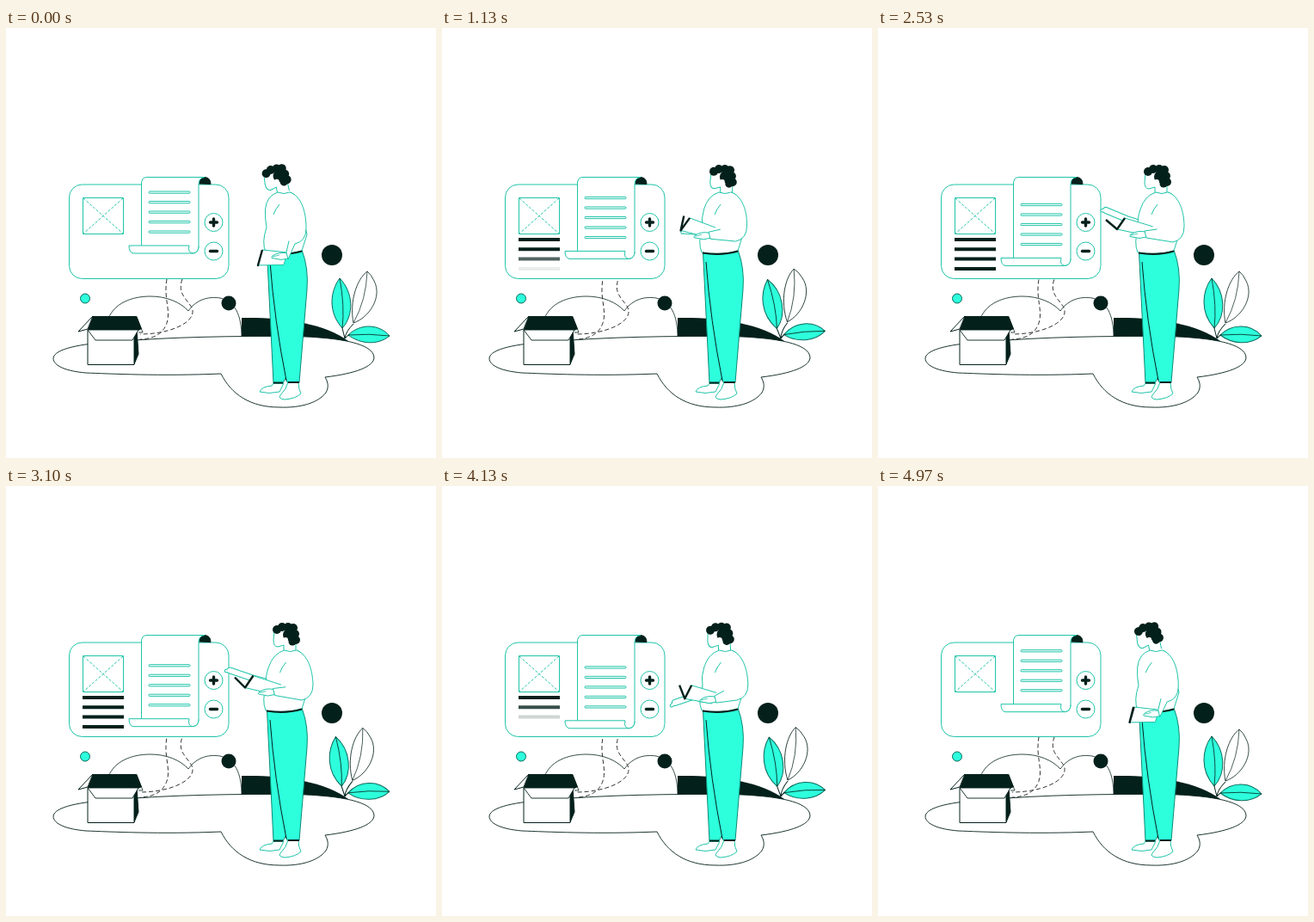
Recreate the animation shown at these times as an HTML page with a canvas. Size 500 by 500 pixels, loop 5 s.

```html
<!DOCTYPE html>
<html lang="en">
<head>
<meta charset="utf-8">
<title>Checking the list</title>
<style>
html, body { margin: 0; width: 100%; height: 100%; overflow: hidden; background: #fff; }
canvas { display: block; width: 500px; height: 500px; }
</style>
</head>
<body>
<canvas id="stage" width="500" height="500"></canvas>
<script>
const LOOP = 5000;
const DARK = '#03201b', TEAL = '#2dffdc', LINE = '#1fc4a8', WHITE = '#fff';
const ctx = document.getElementById('stage').getContext('2d');
const clamp = v => Math.max(0, Math.min(1, v));

// head x, head angle, shoulder x, elbow, wrist, spine foot, spine top, page corner, cover tip, far elbow, far hand
const poses = [
  [0,    -12, -12, -7, 338, 238, 320, 265, 293, 276, 298, 258, 327, 261, 298, 258, 312, 262, 302, 268],
  [630,    0,   0,  0, 345, 236, 306, 248, 280, 246, 289, 231, 320, 239, 289, 231, 308, 240, 294, 241],
  [1670,   2,   2, -2, 342, 234, 302, 234, 275, 224, 287, 210, 317, 225, 273, 205, 295, 234, 271, 230],
  [2530,  -1,   0,  0, 345, 236, 304, 240, 278, 234, 287, 221, 320, 231, 265, 223, 289, 222, 265, 212],
  [3670,   1,   0,  1, 347, 236, 305, 239, 278, 235, 288, 220, 322, 232, 267, 222, 282, 224, 256, 217],
  [4530,  -6,  -7, -2, 343, 236, 316, 256, 286, 258, 292, 242, 318, 248, 284, 240, 303, 262, 284, 282]
];
poses.push([LOOP, ...poses[0].slice(1)]);

function poseAt(t) {
  const i = poses.findIndex(p => p[0] > t);
  const a = poses[i - 1], b = poses[i], k = (t - a[0]) / (b[0] - a[0]);
  return a.map((v, j) => v + (b[j] - v) * k).slice(1);
}

function draw(d, fill, stroke, width = 1) {
  const path = new Path2D(d);
  if (fill) { ctx.fillStyle = fill; ctx.fill(path); }
  if (stroke) { ctx.strokeStyle = stroke; ctx.lineWidth = width; ctx.stroke(path); }
}

function dot(x, y, r, fill, stroke) {
  ctx.beginPath();
  ctx.arc(x, y, r, 0, Math.PI * 2);
  if (fill) { ctx.fillStyle = fill; ctx.fill(); }
  if (stroke) { ctx.strokeStyle = stroke; ctx.lineWidth = 1; ctx.stroke(); }
}

function box(x, y, w, h, r, fill, stroke) {
  ctx.beginPath();
  ctx.roundRect(x, y, w, h, r);
  if (fill) { ctx.fillStyle = fill; ctx.fill(); }
  if (stroke) { ctx.strokeStyle = stroke; ctx.lineWidth = 1; ctx.stroke(); }
}

function dashed(d, color, dash, shift = 0) {
  ctx.setLineDash(dash);
  ctx.lineDashOffset = shift;
  draw(d, null, color);
  ctx.setLineDash([]);
}

function turned(x, y, deg, paint) {
  ctx.save();
  ctx.translate(x, y);
  ctx.rotate(deg * Math.PI / 180);
  paint();
  ctx.restore();
}

function scenery(t) {
  draw('M119 338C126 320 146 312 168 312C187 312 203 319 212 329C222 315 236 312 249 314C266 318 274 333 274 360L119 364Z', WHITE, DARK, .8);
  draw('M274 337C320 336 370 343 398 364L274 361Z', DARK);
  draw('M55 384C56 373 87 367 125 365C190 359 270 358 335 358.500C390 360 427 367 428 383C428 394 405 402 371 406C374 411 376 417 372 424C363 436 342 442 318 441C284 441 262 426 250 402C180 405 120 402 93 401C70 399 55 393 55 384Z', WHITE, DARK, .9);
  const flow = -80 * t / LOOP;
  dashed('M187 292C183 315 192 328 187 343Q181 361 156 362', '#333', [5, 3], flow);
  dashed('M205 292C198 311 214 317 217 328C219 344 188 356 156 356', '#333', [5, 3], flow);
  dot(259, 320, 8.5, DARK);
  dot(379, 264, 12, DARK);
  dot(92, 314.500, 5.5, TEAL, '#0a6b5c');
}

function carton() {
  draw('M101 335H152L158 350L149 354L95 351Z', DARK);
  draw('M149 354L152 350L154 379L149 391Z', DARK, DARK);
  draw('M95 351H149V391.500H95Z', WHITE, DARK);
  draw('M101 335L84 353L95 350Z', WHITE, DARK);
  draw('M95 351L104 363H147L154 351Z', WHITE, DARK, .9);
  draw('M152 336L159 354L154 354', null, DARK, .8);
}

function plant(t) {
  const sway = -8 * Math.sin(Math.PI * t / 2500) ** 2;
  turned(394, 361, sway, () => {
    draw('M0 0Q1 -8 10 -17M0 0L-3 -12M0 0L4 -4', null, DARK);
    draw('M26 -78C14 -69 5 -43 10 -18C28 -24 44 -48 34 -67Q31 -74 26 -78Z', WHITE, DARK, .8);
    draw('M26 -78Q25 -45 10 -18', null, DARK, .7);
    draw('M-6 -70C-17 -55 -20 -31 -3 -12C11 -27 10 -54 -6 -70Z', TEAL, '#0a6b5c');
    draw('M-6 -70Q0 -38 -3 -12', null, DARK, .8);
  });
  turned(394, 361, sway * .8, () => {
    draw('M4 -4C18 -18 40 -17 52 -3C39 8 18 7 4 -4Z', TEAL, '#0a6b5c');
    draw('M0 0L4 -4Q28 -6 52 -3', null, DARK, .8);
  });
}

function card(t) {
  box(73.5, 182, 185.5, 109.500, 15, WHITE, LINE);
  box(89.5, 197.5, 47, 42, 0, null, LINE);
  dashed('M90 198L136 239M136 198L90 239', LINE, [3, 2]);

  const near = Math.min(t, LOOP - t);
  for (let i = 0; i < 4; i++) {
    ctx.globalAlpha = clamp((near - 130 - 320 * i) / 530);
    box(89, 244 + 11.3 * i, 48, 4, 0, DARK);
  }
  ctx.globalAlpha = 1;

  for (const y of [226, 259.500]) {
    dot(241.500, y, 10.5, WHITE, LINE);
    ctx.lineCap = 'round';
    draw(`M237.500 ${y}h8` + (y < 240 ? `M241.500 ${y - 4}v8` : ''), null, DARK, 3.4);
    ctx.lineCap = 'butt';
  }
}

function receipt(t) {
  const drop = t < 4000 ? 5.7 * t / 1000 : 22.8 * (LOOP - t) / 1000;
  draw('M224 181Q225 174 231 173.500Q238 174 238 181.500Z', DARK, DARK);
  draw(`M157.500 ${253 + drop}V180Q158 173.500 164 173.500H231Q224 174 224 182V${255 + drop}Q223 262 217 262V${253 + drop}Z`, WHITE);
  draw(`M157.500 ${253 + drop}V180Q158 173.500 164 173.500H231Q224 174 224 182V${255 + drop}Q223 ${262 + drop} 217 ${262 + drop}`, WHITE, LINE);
  draw(`M217 ${262 + drop}H148Q143 ${261 + drop} 143 ${253 + drop}H213Q211 ${261 + drop} 217 ${262 + drop}Q224 ${261 + drop} 224 ${254 + drop}`, WHITE, LINE);
  for (let i = 0; i < 5; i++) box(166, 190 + 11.5 * i + drop, 48, 2.2, 1, WHITE, LINE);
}

function legs() {
  draw('M311 413L309 416Q297 417 295 423Q306 426 318 423L323 413Z', WHITE, LINE);
  draw('M328 412Q326 420 319 427Q316 431 324 432Q337 431 343 425Q340 420 340 412Z', WHITE, LINE);
  draw('M303.500 261L344 258Q352 279 350 304L341 412H327L325 407L322 413H311Z', TEAL, '#0b8b76');
  draw('M307 272Q312 340 326 410', null, DARK);
  draw('M311 412.500H322M328 412H341', null, DARK, 1.8);
}

function head(x, angle) {
  turned(325 + x, 170, angle, () => {
    draw('M-13 -1L-14 9Q-14 17 -9 17L-2 15V23L12 22V6Z', WHITE);
    draw('M-13 -1L-14 9Q-14 17 -9 17L-2 15V22M12 14V22', null, LINE);
    const curls = [[-10, -3, 5], [-4, -6, 5], [3, -6, 5], [9, -5, 5], [11, 2, 5], [12, 9, 5], [8, 11, 4.5], [4, 3, 7]];
    for (const [cx, cy, r] of curls) dot(cx, cy, r, DARK);
    dot(0, 9, 3, WHITE);
  });
}

function person(t) {
  const [hx, tilt, s, ex, ey, wx, wy, sx, sy, tx, ty, px, py, cx, cy, ax, ay, fx, fy] = poseAt(t);

  // far arm
  ctx.lineCap = ctx.lineJoin = 'round';
  const reach = `M308 ${ay + 6}L${ax} ${ay}L${fx} ${fy}`;
  const fingers = `M${fx} ${fy}l${(fx - ax) * .18} ${(fy - ay) * .18 + 2}`;
  for (const [color, grow] of [[LINE, 2], [WHITE, 0]]) {
    draw(reach, null, color, 6 + grow);
    draw(fingers, null, color, 2.5 + grow);
  }
  ctx.lineCap = 'butt';

  legs();
  head(hx, tilt);
  draw(`M${323 + s} 191Q${310 + s} 195 ${305 + s / 2} 211Q301 222 303 232Q297 249 302 261Q323 265 344 259L350 240L${348 + s} 201Q${344 + s} 193 ${337 + s} 191Q${330 + s} 194 ${323 + s} 191Z`, WHITE, LINE);
  draw('M303 261.500Q325 265 344 259.500', null, DARK, 2.2);

  // book
  const bx = px + (sx - tx) * .8, by = py + (sy - ty) * .8;
  draw(`M${sx} ${sy}L${tx} ${ty}L${px} ${py}L${bx} ${by}Z`, WHITE, LINE);
  draw(`M${cx} ${cy}L${sx} ${sy}L${tx} ${ty}`, null, DARK, 2.4);

  // near arm and hand
  draw(`M${wx + 7} ${wy - 3}Q${wx - 3} ${wy - 5} ${wx - 10} ${wy}Q${wx - 13} ${wy + 3} ${wx - 8} ${wy + 3}Q${wx} ${wy + 6} ${wx + 8} ${wy + 3}Z`, WHITE, LINE);
  draw(`M${wx - 10} ${wy + 1}L${wx - 2} ${wy - 1}`, null, LINE, .8);
  draw(`M${337 + s} 191C${350 + s} 195 ${356 + s} 213 ${ex + 11} ${ey - 5}Q${ex + 11} ${ey + 10} ${ex - 2} ${ey + 13}L${wx + 8} ${wy + 4}L${wx + 6} ${wy - 4}Q${ex - 20} ${ey - 2} ${320 + s} 217L${325 + s} 205Z`, WHITE);
  draw(`M${337 + s} 191C${350 + s} 195 ${356 + s} 213 ${ex + 11} ${ey - 5}Q${ex + 11} ${ey + 10} ${ex - 2} ${ey + 13}L${wx + 8} ${wy + 4}L${wx + 6} ${wy - 4}L${(wx + ex) / 2} ${(wy + ey) / 2 - 4}M${318 + s} 217Q${320 + s} 211 ${325 + s} 205`, null, LINE);
}

function frame(now) {
  const t = now % LOOP;
  ctx.fillStyle = WHITE;
  ctx.fillRect(0, 0, 500, 500);
  scenery(t);
  carton();
  card(t);
  receipt(t);
  plant(t);
  person(t);
  requestAnimationFrame(() => frame(performance.now() - start));
}

const start = performance.now();
frame(0);
</script>
</body>
</html>
```
